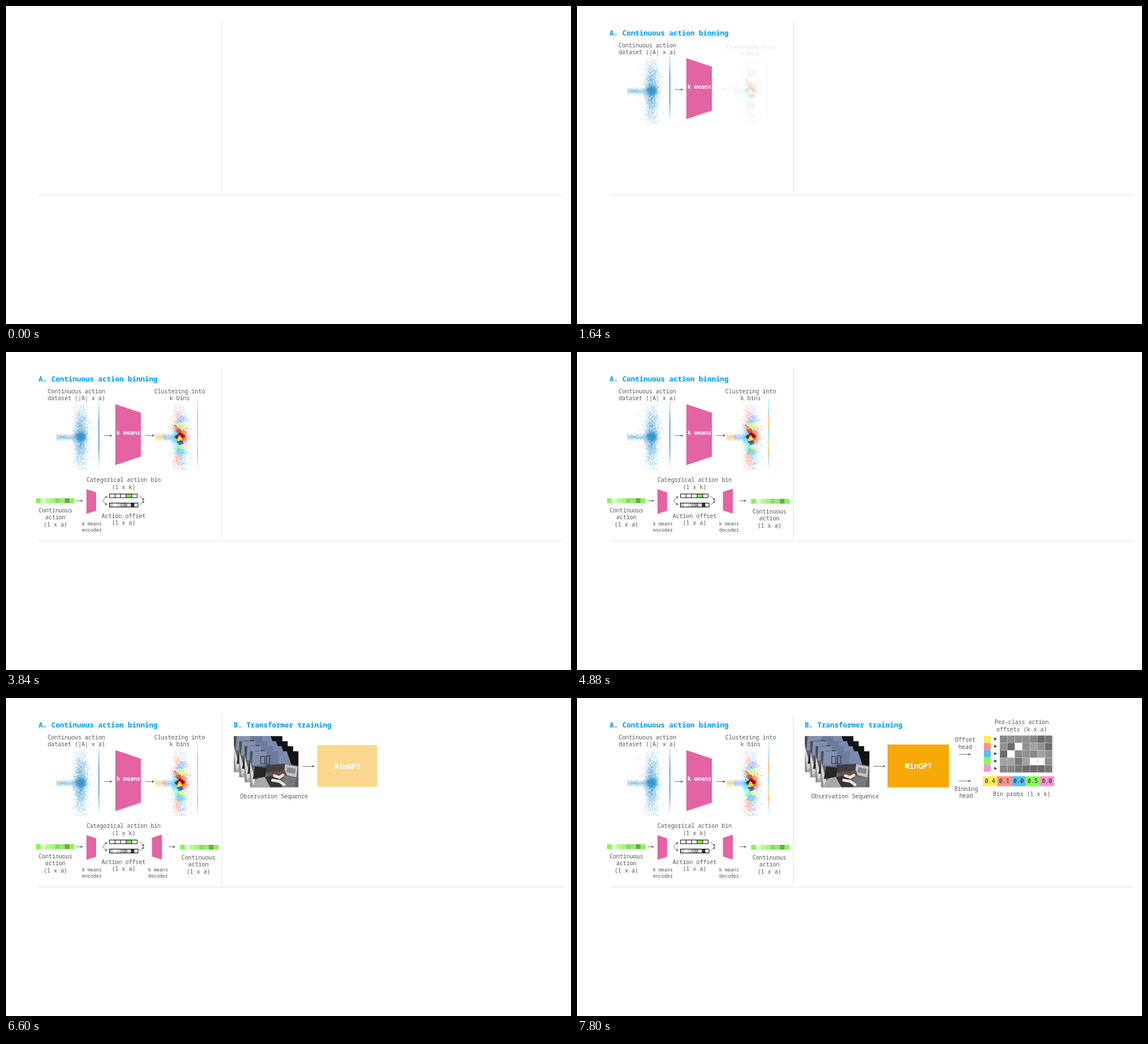
Animation, 997 px wide and 561 px high, one loop 8000 ms. Source, as an HTML page:

```html
<!DOCTYPE html>
<html lang="en">
<head>
<meta charset="utf-8">
<title>Continuous action binning</title>
<style>
html, body { margin: 0; width: 100%; height: 100%; overflow: hidden; background: #fff; }
svg { display: block; width: 100vw; height: 100vh; }
text { font-family: "Noto Sans Mono", "DejaVu Sans Mono", monospace; font-size: 9.95px; font-weight: 500; fill: #555; text-anchor: middle; }
</style>
</head>
<body>
<svg id="stage" viewBox="0 0 997 561" xmlns="http://www.w3.org/2000/svg"></svg>
<script>
const LOOP = 8000;
const PINK = '#e463a3', BLUE = '#009bf5', GREY = '#606060';
const stage = document.getElementById('stage');

function add(parent, tag, attrs, content) {
  const el = document.createElementNS('http://www.w3.org/2000/svg', tag);
  for (const k in attrs) el.setAttribute(k, attrs[k]);
  if (content) el.textContent = content;
  parent.appendChild(el);
  return el;
}
const rect = (g, x, y, width, height, fill, more) => add(g, 'rect', { x, y, width, height, fill, ...more });
const poly = (g, points, fill) => add(g, 'polygon', { points, fill });

function label(g, x, y, lines, style = '', step = 12.5) {
  lines.split('\n').forEach((s, i) => add(g, 'text', { x, y: y + i * step, style }, s));
}
const heading = (g, x, y, s) => label(g, x, y, s, `font-size:12.5px;font-weight:700;fill:${BLUE};text-anchor:start`);

function arrow(g, x1, y1, x2, y2) {
  const turn = Math.atan2(y2 - y1, x2 - x1) * 180 / Math.PI;
  add(g, 'path', { d: `M${x1} ${y1}L${x2 - 1} ${y2}`, stroke: GREY, 'stroke-width': 0.9 });
  add(g, 'path', { d: 'M0 0l-4 -1.8v3.6z', fill: '#505050', transform: `translate(${x2} ${y2}) rotate(${turn})` });
}

function cells(g, x, y, w, h, colors) {
  colors.forEach((c, i) => rect(g, x + i * w, y, w + 0.05, h, c));
}

function fadeLine(g, id, x, stops) {
  const grad = add(g, 'linearGradient', { id, x1: 0, y1: 0, x2: 0, y2: 1 });
  for (const [offset, color, alpha] of stops)
    add(grad, 'stop', { offset, 'stop-color': color, 'stop-opacity': alpha });
  rect(g, x, 80, 1.4, 126, `url(#${id})`);
}

// Each group fades in and grows about the centre of its box.
const groups = [];
function group(first, last, x1, y1, x2, y2) {
  const el = add(stage, 'g', { opacity: 0 });
  groups.push({ el, start: first - 40, end: last, cx: (x1 + x2) / 2, cy: (y1 + y2) / 2 });
  return el;
}

// Seeded random cloud
let seed = 7;
function rnd() {
  seed = (seed + 0x6D2B79F5) | 0;
  let t = Math.imul(seed ^ (seed >>> 15), 1 | seed);
  t = (t + Math.imul(t ^ (t >>> 7), 61 | t)) ^ t;
  return ((t ^ (t >>> 14)) >>> 0) / 4294967296;
}
const gauss = () => Math.sqrt(-2 * Math.log(1 - rnd())) * Math.cos(2 * Math.PI * rnd());

const cloud = [];
function scatter(n, place) {
  for (let i = 0; i < n; i++) {
    const p = place();
    if (Math.abs(p[1]) < 58 && p[0] < 30) cloud.push(p);
  }
}
scatter(1500, () => [gauss() * 4.4, gauss() * 4.4]);
scatter(2500, () => [gauss() * 6.3, gauss() * 27]);
scatter(300, () => [gauss() * 11, gauss() * 30]);
scatter(480, () => [-6 - rnd() * 37, gauss() * 2.8]);

function dots(g, points, color, alpha) {
  const size = 60;
  for (let i = 0; i < points.length; i += size) {
    const d = points.slice(i, i + size).map(p => `M${p[0].toFixed(1)} ${p[1].toFixed(1)}h.01`).join('');
    add(g, 'path', { d, stroke: color, 'stroke-opacity': alpha, 'stroke-width': 1.6, 'stroke-linecap': 'round', fill: 'none' });
  }
}

// Cluster centres relative to the cloud: x, y, colour
const clusters = [
  [-7, -37, '#ff8f75'], [1, -31, '#6f9dff'], [8, -46, '#9fc4ff'], [2, -19, '#b6f56a'],
  [-4, -12, '#c81400'], [-5, 0, '#a00000'], [4, -2, '#900000'], [8, -7, '#ff5a20'],
  [8, 5, '#ff4a10'], [-9, -6, '#19d3ff'], [-9, 5, '#10c8f0'], [1, 10, '#0a24b8'],
  [-1, 2, '#f4e02c'], [3, 17, '#d8ee40'], [-6, 16, '#58e8b8'], [1, 25, '#20b8f0'],
  [-5, 38, '#ff7452'], [7, 40, '#5f9bff'], [14, 15, '#6aa4ff'], [-37, 0, '#ffc24a'], [-23, 0, '#78a8ff']
];

function strip(g, x, y) {
  cells(g, x, y, 8.45, 8.6, ['#84f74a', '#dcfbcb', '#b5f98f', '#9ffa6e', '#90d670', '#8ef25e', '#6ea850', '#86f94c']);
}

function view(g, x, y) {
  const v = add(g, 'svg', { x, y, width: 85.5, height: 63.5, viewBox: '0 0 85.5 63.5', overflow: 'hidden' });
  rect(v, 0, 0, 86, 64, '#62646a');
  poly(v, '0,0 9,0 4,26 0,40', '#4b4d52');
  poly(v, '5,0 30,0 26,25 3,25', '#8290b0');
  poly(v, '30,0 50,0 50,24 27,25', '#6d7b9c');
  poly(v, '50,0 67,0 72,23 50,24', '#7c8bad');
  poly(v, '65,0 86,0 86,26 73,23', '#121315');
  poly(v, '0,16 11,58 0,63.5', '#d6d6d4');
  poly(v, '0,30 5,63.5 0,63.5', '#8f9092');
  poly(v, '11,50 26,41 44,63.5 3,63.5', '#a9a9a7');
  poly(v, '28,24 62,22 64,34 28,38', '#403f42');
  poly(v, '62,23 84,27 82,46 60,41', '#c4c5c6');
  poly(v, '66,28 81,31 79,40 64,37', '#85888c');
  poly(v, '9,27 29,29 27,45 5,49', '#252628');
  add(v, 'path', { d: 'M19 9h7v13h-7zM29 8h6v14h-6z', fill: 'none', stroke: '#33363c', 'stroke-width': 1.2 });
  poly(v, '30,37 62,34 66,46 40,52', '#6b4c45');
  poly(v, '26,45 44,43 60,63.5 36,63.5', '#353639');
  poly(v, '60,43 82,47 78,63.5 56,63.5', '#77797d');
  add(v, 'path', { d: 'M43 43l9 3 6 -4M40 51l12 2 8 6', fill: 'none', stroke: '#e4e6dc', 'stroke-width': 5, 'stroke-linecap': 'round' });
}

// Dividers
rect(stage, 381, 29, 1, 301, '#e3e3e3');
rect(stage, 58, 333, 926, 1, '#e3e3e3');

// Data set and k means
let g = group(640, 960, 58, 42, 267, 199);
heading(g, 57.6, 51.8, 'A. Continuous action binning');
label(g, 124.2, 72.8, 'Continuous action\ndataset (|A| x a)');
dots(add(g, 'g', { transform: 'translate(132 150)' }), cloud, '#3a94cc', 0.2);
fadeLine(g, 'rayA', 163.2, [[0, '#3a94cc', 0.05], [0.12, '#3a94cc', 0.4], [0.35, '#2b82ba', 0.95], [0.7, '#2b82ba', 0.95], [0.9, '#3a94cc', 0.4], [1, '#3a94cc', 0]]);
arrow(g, 172.5, 147.4, 187.5, 147.4);
poly(g, '193,92 238,107 238,184.5 193,199.5', PINK);
label(g, 216, 146.3, 'k means', 'fill:#fff;font-weight:700');

// Clusters
g = group(1640, 1920, 246, 65, 351, 204);
label(g, 306.4, 72.8, 'Clustering into\nk bins');
arrow(g, 246, 147.4, 262, 147.4);
const bins = clusters.map(() => []);
for (const p of cloud) {
  let best = 0, near = Infinity;
  clusters.forEach((c, i) => {
    const d = Math.hypot(p[0] - c[0], p[1] - c[1]);
    if (d < near) { near = d; best = i; }
  });
  bins[best].push(p);
}
const tinted = add(g, 'g', { transform: 'translate(307 150)' });
clusters.forEach((c, i) => dots(tinted, bins[i], c[2], 0.36));
fadeLine(g, 'rayB', 337.3, [[0, '#5fd8f0', 0.3], [0.22, '#4fd4ee', 0.9], [0.27, '#ffa640', 1], [0.42, '#ffb347', 1], [0.46, '#50dcec', 1], [0.58, '#8cf0a0', 1], [0.7, '#d8e060', 1], [0.75, '#ffa640', 1], [0.84, '#ffb347', 0.9], [0.88, '#5fd8f0', 0.7], [1, '#5fd8f0', 0.1]]);

// Encoder
g = group(2560, 2880, 53, 242, 179, 317);
strip(g, 53, 258);
label(g, 87.2, 282.8, 'Continuous\naction\n(1 x a)');
arrow(g, 124, 262.5, 136, 262.5);
poly(g, '142,242 159,247.5 159,280 142,285.5', PINK);
label(g, 151.5, 306.2, 'k means\nencoder', 'font-size:8.4px', 10.4);
arrow(g, 170.5, 262.5, 178.5, 254.2);
arrow(g, 170.5, 262.5, 178.5, 270.2);

// Bin and offset
g = group(3520, 3840, 143, 221, 272, 306);
label(g, 207.5, 229, 'Categorical action bin\n(1 x k)');
rect(g, 212, 250.5, 10, 6.5, '#7fe84a');
add(g, 'path', { d: 'M182.5 250.5h49v6.5h-49zM192.5 250.5v6.5M202 250.5v6.5M212 250.5v6.5M222 250.5v6.5', fill: 'none', stroke: '#000' });
cells(g, 182.5, 266.5, 6.3, 7, ['#c4c4c4', '#fff', '#d5d5d5', '#b0b0b0', '#999', '#ddd', '#333', '#eee']);
rect(g, 182.5, 266.5, 50.5, 7, 'none', { stroke: '#000' });
label(g, 207.5, 292.7, 'Action offset\n(1 x a)');
arrow(g, 236, 254, 244, 261.6);
arrow(g, 236, 270.2, 244, 262.8);

// Decoder
g = group(4520, 4880, 251, 241, 375, 316);
poly(g, '275,241 257.5,246.7 257.5,279.5 275,285', PINK);
label(g, 268.3, 306.2, 'k means\ndecoder', 'font-size:8.4px', 10.4);
arrow(g, 287, 262.5, 299, 262.5);
strip(g, 307.3, 259);
label(g, 339.5, 284.7, 'Continuous\naction\n(1 x a)');

// Observations
g = group(5520, 5880, 402, 41, 574, 179);
heading(g, 401.8, 51.6, 'B. Transformer training');
for (let i = 0; i < 4; i++) view(g, 402 + i * 9.5, 67.2 + i * 8.95);
arrow(g, 523, 120.5, 544.5, 120.5);
label(g, 473, 177, 'Observation Sequence');

// Model
g = group(6480, 6840, 548, 82, 656, 158);
rect(g, 548, 82, 108.3, 75.7, '#f6a908');
label(g, 602.5, 125.1, 'MinGPT', 'font-size:13.3px;font-weight:600;fill:#fff');

// Heads
g = group(7480, 7800, 666, 39, 842, 176);
label(g, 685, 77.3, 'Offset\nhead');
arrow(g, 674, 99.4, 695, 99.4);
arrow(g, 674, 146.4, 695, 146.4);
label(g, 686.6, 163.8, 'Binning\nhead');
label(g, 784.7, 46.2, 'Per-class action\noffsets (k x a)');
const hues = ['#fbee58', '#fd938c', '#56bdf9', '#87fa4e', '#fb92cf'];
const shades = ['#6c6c6c', '#787878', '#888888', '#919191', '#a2a2a2', '#ffffff'];
rect(g, 746, 66, 93, 65.6, '#c9c9c9');
['2333201', '3053430', '0523243', '4414553', '2210001'].forEach((row, r) => {
  [...row].forEach((s, c) => rect(g, 746.4 + c * 13.25, 66.4 + r * 13.1, 12.5, 12.4, shades[s]));
  rect(g, 718, 66.5 + r * 12.7, 12, 12.75, hues[r]);
  const y = 72.3 + r * 13;
  poly(g, `736,${y - 2.8} 741.5,${y} 736,${y + 2.8}`, '#505050');
});
cells(g, 716.3, 138, 25.1, 17.6, hues);
['0.4', '0.1', '0.0', '0.5', '0.0'].forEach((s, i) => label(g, 728.9 + i * 25.1, 150.3, s, 'fill:#222;font-size:10.2px'));
label(g, 784.7, 172.8, 'Bin probs (1 x k)');

function draw(t) {
  for (const { el, start, end, cx, cy } of groups) {
    const p = Math.min(1, Math.max(0, (t - start) / (end - start)));
    const k = Math.pow(p, 0.85);
    const s = 0.95 + 0.05 * k;
    el.setAttribute('opacity', k);
    el.setAttribute('transform', p < 1 ? `translate(${cx * (1 - s)} ${cy * (1 - s)}) scale(${s})` : '');
  }
}

const began = performance.now();
function tick() {
  draw((performance.now() - began) % LOOP);
  requestAnimationFrame(tick);
}
tick();
</script>
</body>
</html>
```
